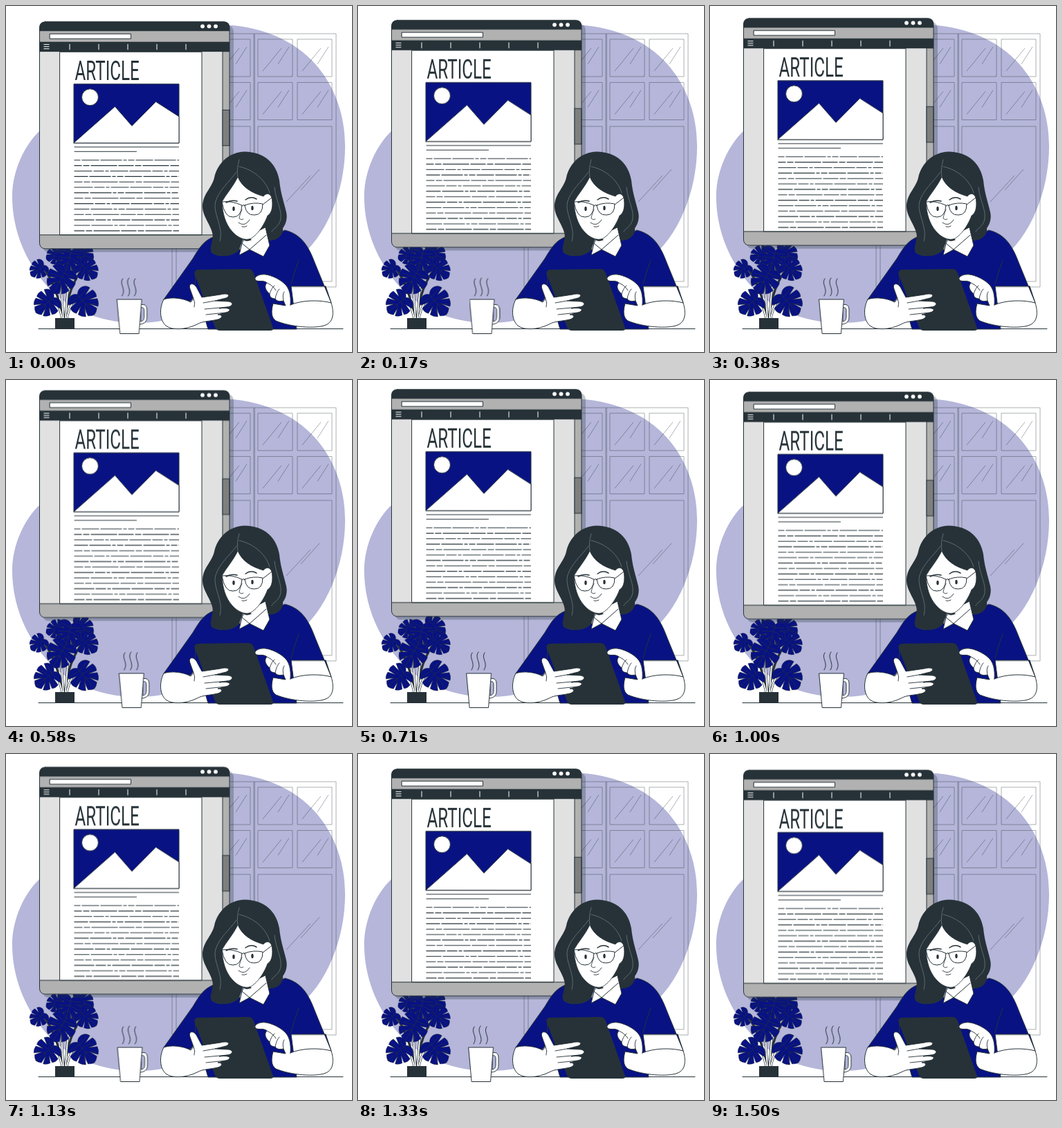
An HTML page for the animation above (1540 ms loop, 500 by 500 pixels).

```html
<!DOCTYPE html>
<html lang="en">
<head>
<meta charset="utf-8">
<title>Reading an article</title>
<style>
html, body { margin: 0; width: 100%; height: 100%; overflow: hidden; background: #fff; }
svg { display: block; width: 100%; height: 100%; }
.ink { fill: none; stroke: #263238; stroke-linecap: round; stroke-linejoin: round; }
.paper { fill: #fff; stroke: #263238; stroke-linecap: round; stroke-linejoin: round; }
.dark { fill: #263238; }
.navy { fill: #081283; stroke: #263238; stroke-linejoin: round; }
.pane { fill: none; stroke: #263238; stroke-width: .7; opacity: .55; }
.strand { fill: none; stroke: #78838a; stroke-width: .7; stroke-linecap: round; }
.title { font: 400 39px Roboto, "Liberation Sans", sans-serif; fill: #263238; }
</style>
</head>
<body>
<svg viewBox="0 0 500 500">
  <defs>
    <g id="leaf">
      <path class="navy" stroke-width=".5" d="M0-14C-6-22-18-20-21-10L-9-6-22-5Q-24 2-20 7L-8 3-19 10Q-17 17-12 20L-5 9-9 21Q-5 25 0 26Q5 25 9 21L5 9 12 20Q17 17 19 10L8 3 20 7Q24 2 22-5L9-6 21-10C18-20 6-22 0-14Z"/>
      <path class="ink" stroke-width=".6" d="M0-14V24M0-9L-15-12M0-9L15-12M0-3L-16 1M0-3L16 1M0 5L-12 15M0 5L12 15"/>
    </g>
  </defs>

  <path fill="#b5b6d9" d="M310 27C365 28 416 48 448 85C477 119 490 160 490 203C490 267 463 335 419 367C360 406 270 458 190 458C130 458 78 434 47 389C22 355 9 315 9 275C9 238 27 201 48 181L130 120Z"/>
  <g id="panes" class="pane">
    <path d="M240 40H477V406H240ZM358 40V406M359.3 40V406"/>
  </g>
  <path class="ink" d="M47 466.5H487"/>

  <g id="plant">
    <path class="ink" stroke-width="3.2" d="M83 452Q80 420 80 386M86 452Q88 415 94 372M81 452Q77 428 64 420M88 452Q92 428 108 417M85 452Q90 405 112 378M82 452Q74 405 54 378"/>
    <path fill="none" stroke="#fff" stroke-width="1.8" d="M83 452Q80 420 80 386M86 452Q88 415 94 372M81 452Q77 428 64 420M88 452Q92 428 108 417"/>
    <g id="leaves"></g>
    <path class="dark" d="M71 451H99V467H71Z"/>
  </g>

  <g id="browser">
    <rect x="53" y="28" width="276" height="328" rx="9" fill="#263238" opacity=".28"/>
    <rect x="48.5" y="23" width="274.5" height="328" rx="8" fill="#b1b1b1"/>
    <path class="dark" d="M48.5 36.5V31Q48.5 23 56.5 23H315Q323 23 323 31V36.5Z"/>
    <path class="dark" d="M48.5 52H323V66.5H48.5Z"/>
    <path fill="#e1e1e1" d="M48.5 66.5H313V331H48.5Z"/>
    <path class="paper" d="M78 66.5H283V331H78Z"/>
    <path class="ink" d="M48.5 331H323M313 66.5V331"/>
    <rect x="313" y="150.5" width="10" height="51.5" fill="#7f7f7f" stroke="#263238"/>
    <rect class="paper" x="63.5" y="40.5" width="117" height="7"/>
    <g fill="#fff"><circle cx="284" cy="29.5" r="2.9"/><circle cx="293.5" cy="29.5" r="2.9"/><circle cx="303" cy="29.5" r="2.9"/></g>
    <path fill="none" stroke="#fff" d="M54.5 55.8H62.5M54.5 58.9H62.5M54.5 62H62.5M92 55V63.5M134 55V63.5M176 55V63.5M218 55V63.5M260 55V63.5"/>
    <text class="title" transform="translate(99.5 107.3) scale(.62 1)">ARTICLE</text>
    <path class="navy" d="M98 113H250V198H98Z"/>
    <path class="paper" d="M98 198L157.5 145.5 182 173.5 216.5 138.5 250 160V198Z"/>
    <circle class="paper" cx="121.5" cy="132" r="12"/>
    <path class="ink" d="M99 204H249.5M99 210.5H188.5"/>
    <g id="lines" fill="none" stroke="#263238" stroke-width="1.1"></g>
    <rect class="ink" x="48.5" y="23" width="274.5" height="328" rx="8"/>
  </g>

  <g id="mug" class="paper">
    <path d="M194 432C201 430 204 433 204 439V450C204 457 199 460 192 460ZM195 436V456C199 455 200 453 200 449V440C200 437 199 435 195 436Z"/>
    <path d="M161 424H196.5L192.5 473.5H165.5Z"/>
    <path class="ink" d="M169 394C163 402 175 409 168 419M178 393C171 401 184 410 177 419M187 394C181 402 193 409 186 419"/>
  </g>

  <g id="reader">
    <path class="dark" d="M345 210.5C321 211 305 229 301 248C297 264 284 272 284 290C284 306 300 320 299 336C298 346 293 352 297 356C307 364 328 362 337 352L345 330 374 323C376 331 379 336 377 339C388 342 398 335 396 325C405 318 407 306 405 298C402 284 397 272 395 252C391 228 374 211 345 210.5Z"/>
    <path class="navy" d="M302 333C286 338 279 350 270 365L228 424C238 440 255 436 268 425L276 412 292 467H420L412 405H462L470 429L447 373C438 349 428 330 403 324L378 336 345 352 337 352C328 362 307 364 297 356C300 350 302 340 302 333Z"/>
    <path class="dark" d="M299 325C300 340 293 350 297 356C307 364 329 362 337 352L340 330ZM374 322L377 339C391 340 402 332 400 320Z"/>
    <path class="ink" d="M423 367Q416 386 412 402M273 404Q275 394 273 385"/>
    <path class="paper" d="M345 335L341 343 337 360 352 352 372 362 381 346 375 320Z"/>
    <path class="ink" d="M341 343L352 352 376 331"/>
    <path class="dark" d="M340 334Q345 343 355 338L350 333Z"/>
    <path class="paper" stroke-width=".8" d="M335 247C329 260 318 272 312 283C313 300 317 315 327 326C337 337 350 341 358 333C366 327 374 314 378 303C385 299 386 287 384 277C381 269 375 271 372 275C355 270 341 262 335 247Z"/>
    <g class="ink">
      <path d="M318 284Q325 280 334 282M346 280Q354 274 362 279" stroke-width="1.5"/>
      <path d="M312 283Q326 281 341 288Q340 305 328 305Q316 306 312 283ZM345 288Q357 283 371 286Q371 302 359 302Q347 303 345 288ZM341 289Q343 286 345 289M371 287L384 277"/>
      <path d="M341 294Q337 304 337 307Q340 310 343 308" stroke-width=".8"/>
      <path d="M336 313Q345 320 352 309M341 319Q345 320 348 318" stroke-width=".9"/>
    </g>
    <ellipse class="dark" cx="329" cy="293" rx="1.7" ry="3.2"/>
    <ellipse class="dark" cx="356" cy="292" rx="1.7" ry="3.2"/>
    <path class="strand" d="M337 222Q333 236 335 247M333 240C322 255 308 266 303 282C298 300 315 318 309 340M337 232C356 236 375 250 381 270M388 262C390 282 399 294 397 308C394 320 386 321 384 326"/>

    <path class="dark" d="M278 381L350 380Q356 380 358 386L386 465Q387 469 382 469H309Q304 469 302 464L273 389Q271 381 278 381Z"/>

    <path class="paper" d="M228 424C238 420 256 422 267 428L271 423 266 409C263 401 270 399 275 406L283 421 310 417C322 414 325 419 318 422L302 426 322 427C330 429 327 434 320 435L308 437C325 435 327 440 318 443L306 446C314 446 313 451 306 453C293 456 285 455 276 460C260 468 240 469 231 462C221 453 222 435 228 424Z"/>
    <path class="ink" stroke-width=".9" d="M302 426L285 429M320 435L287 438M318 443L289 446M271 423Q274 429 272 435"/>

    <path class="paper" d="M411 432C412 419 410 407 401 400C394 394 383 389 375 388C366 387 359 391 360 395C362 400 372 395 377 400C372 405 376 412 381 416C381 421 385 423 389 423C391 427 396 427 401 426L404 433 386 430C383 441 383 450 390 455C412 464 447 467 462 461C474 456 474 442 470 429C456 425 429 424 411 432Z"/>
    <path class="ink" stroke-width=".9" d="M377 400Q386 404 390 411M381 416Q384 407 388 404M389 423Q391 413 395 409M401 426Q399 417 402 413"/>
  </g>
</svg>
<script>
const $ = id => document.getElementById(id);
const add = (id, markup) => $(id).insertAdjacentHTML('beforeend', markup);

// Window panes: two small rows above one tall pane per door
for (const x of [246, 303, 364, 421]) {
  for (const y of [48, 110.5]) {
    add('panes', `<path d="M${x} ${y}h50v54h-50zm7 46l27-33m-5 23l16-25"/>`);
  }
}
for (const x of [246, 364]) {
  add('panes', `<path d="M${x} 174h107v224h-107zm41 109l35-38m-14 21l27-30"/>`);
}

// x, y, scale, angle
[
  [73, 360, .62, 70], [108, 357, .78, -65], [48, 380, .6, 50],
  [91, 366, .95, 15], [116, 380, .75, -50], [80, 394, .95, 30],
  [60, 429, .85, 50], [112, 427, .95, -40]
].forEach(([x, y, s, a]) =>
  add('leaves', `<use href="#leaf" transform="translate(${x} ${y}) rotate(${a}) scale(${s})"/>`));

const dashes = ['9 2 25 2 31 2 5 2', '22 2 9 2 38 2', '31 2 15 2 5 2 26 2'];
for (let i = 0; i < 14; i++) {
  add('lines', `<path d="M98.5 ${223 + i * 7.85}H250" stroke-dasharray="${dashes[i % 3]}" stroke-dashoffset="${i * 11 % 17}"/>`);
}

const loop = (id, frames) =>
  $(id).animate(frames, { duration: 1540, delay: -60, iterations: Infinity });

loop('browser', [0.6, -9.4, 0.6].map(y => ({ transform: `translateY(${y}px)` })));
loop('mug', [0, -1, 2, -4, 4, -4, 4, -4, 2, -1, 0].map(x => ({ transform: `translateX(${x}px)` })));
</script>
</body>
</html>
```
